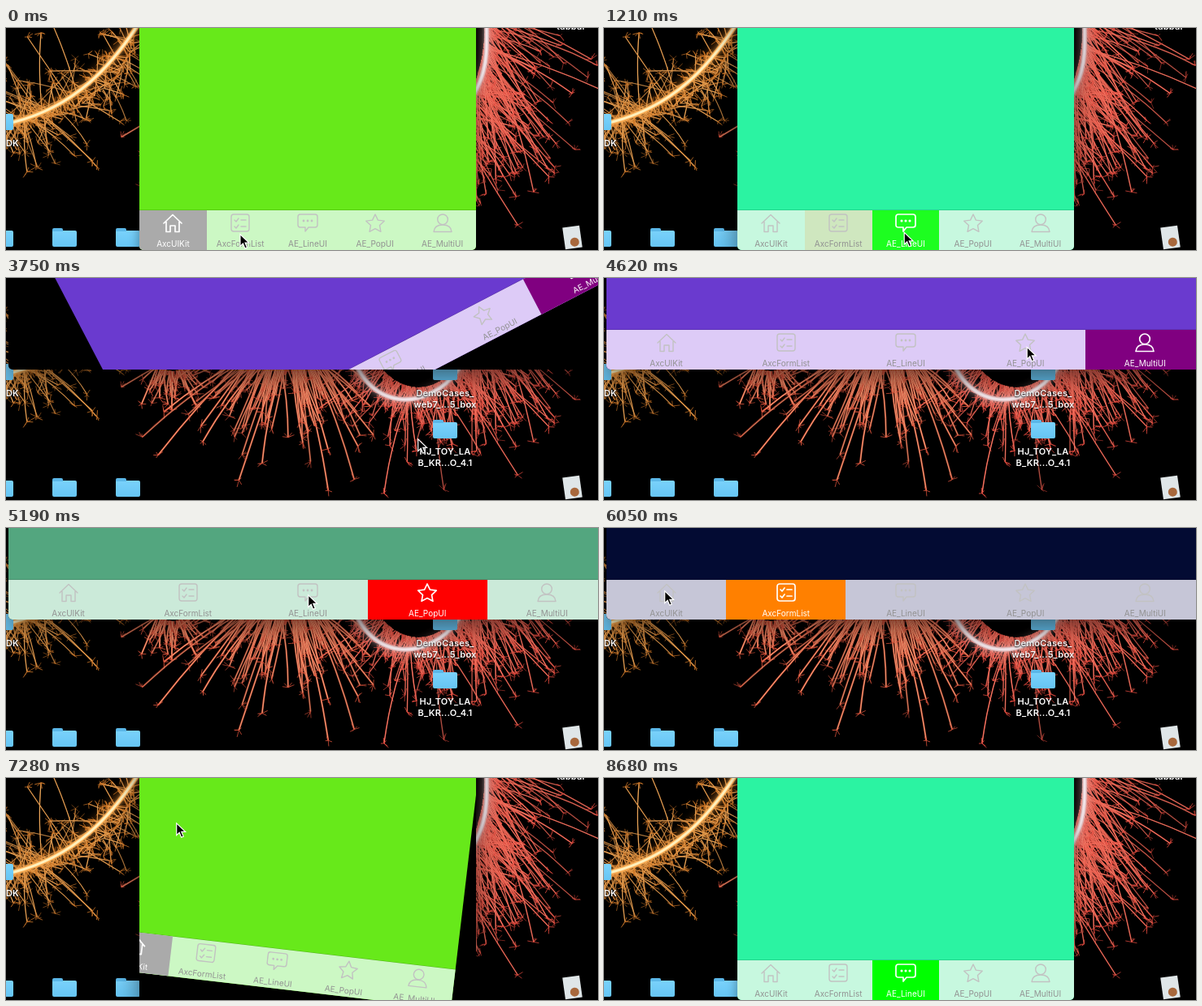
An HTML page with a canvas that plays this animation: 728 by 274 pixels, repeating every 8.78 s.

```html
<!DOCTYPE html>
<html lang="en">
<head>
<meta charset="utf-8">
<title>Tab bar demo</title>
<style>
  html, body { margin: 0; width: 100%; height: 100%; overflow: hidden; background: #000; }
  #stage { position: relative; width: 728px; height: 274px; overflow: hidden; background: #000; }
  #stage > * { position: absolute; }
  .folder { width: 30px; height: 20px; border-radius: 1px 2px 2px 2px;
    background: linear-gradient(#7ad2fb, #66c5f4); }
  .folder::before { content: ""; position: absolute; left: 0; top: -3px; width: 13px; height: 4px;
    border-radius: 2px 2px 0 0; background: #5bb7e8; }
  .label { width: 100px; text-align: center; color: #fff; font: 600 11px/14px Inter, "Open Sans", sans-serif;
    letter-spacing: .2px; text-shadow: 0 1px 2px #000; }
  .paper { left: 686px; top: 245px; width: 21px; height: 27px; background: #dfe6e8; transform: rotate(-8deg); }
  .paper::after { content: ""; position: absolute; left: 7px; top: 14px; width: 11px; height: 11px;
    border-radius: 50%; background: #a8683c; }
  #phone { overflow: hidden; background: #000; border-radius: 5px; }
  #view { position: absolute; left: 50%; top: 50%; }
  #bar { position: absolute; left: 0; right: 0; bottom: 0; height: 49px; display: flex;
    box-shadow: 0 -.5px rgba(0, 0, 0, .25); }
  .tab { position: relative; flex: 1; color: #929292; text-align: center;
    font: 10px/12px Inter, "Liberation Sans", sans-serif; }
  .tab i { position: absolute; inset: 0; }
  .tab svg { position: absolute; left: 50%; top: 3px; margin-left: -13px; width: 26px; height: 26px;
    fill: none; stroke: #c2c2c2; stroke-width: 1.4; stroke-linejoin: round; stroke-linecap: round; }
  .tab span { position: absolute; left: 0; width: var(--tab); top: 35px; white-space: nowrap; }
  .tab.on { color: #fff; }
  .tab.on svg { stroke: #fff; stroke-width: 1.7; }
  #cursor { left: 0; top: 0; width: 14px; height: 20px; overflow: visible; }
</style>
</head>
<body>
<div id="stage">
  <canvas id="sky" width="728" height="274"></canvas>
  <div class="folder" style="left:-21px;top:106px"></div>
  <div class="folder" style="left:-21px;top:250px"></div>
  <div class="folder" style="left:57px;top:250px"></div>
  <div class="folder" style="left:135px;top:250px"></div>
  <div class="folder" style="left:525px;top:106px"></div>
  <div class="folder" style="left:525px;top:178px"></div>
  <div class="label" style="left:-84px;top:135px;text-align:right">DK</div>
  <div class="label" style="left:645px;top:-9px">tabbar</div>
  <div class="label" style="left:490px;top:135px">DemoCases_<br>web7_...5_box</div>
  <div class="label" style="left:490px;top:207px">HJ_TOY_LA<br>B_KR...O_4.1</div>
  <div class="paper"></div>
  <div id="phone"><div id="view"><div id="bar"></div></div></div>
  <svg id="cursor" viewBox="0 0 14 20">
    <path d="M.7 .8V15.6L4.2 12.3 6.6 18.2 9.2 17.1 6.8 11.4H11.6Z" fill="#000" stroke="#fff" stroke-width="1.2"/>
  </svg>
</div>
<script>
const $ = id => document.getElementById(id);
const clamp = v => Math.min(1, Math.max(0, v));
const ease = v => v * v * (3 - 2 * v);
const mix = (a, b, p) => a + (b - a) * p;
const polar = (deg, rx, ry = rx) => [Math.cos(deg * Math.PI / 180) * rx, Math.sin(deg * Math.PI / 180) * ry];

// --- wallpaper: glowing rings that throw sparks outwards ---
const g = $('sky').getContext('2d');
let seed = 11;
const rnd = (a = 0, b = 1) => {
  seed = (seed * 16807) % 2147483647;
  return a + (b - a) * seed / 2147483647;
};

function streak(x, y, dx, dy, bend, color, width) {
  g.beginPath();
  g.moveTo(x, y);
  g.quadraticCurveTo(x + dx / 2 + bend, y + dy / 2 - Math.abs(bend), x + dx, y + dy);
  g.strokeStyle = color;
  g.lineWidth = width;
  g.stroke();
}

function spark(x, y, deg, len, { body, core, width }) {
  const [dx, dy] = polar(deg, len), bend = rnd(-.07, .07) * len;
  g.globalAlpha = rnd(.55, 1);
  streak(x, y, dx, dy, bend, body, width);
  if (len < 14) return;
  streak(x, y, dx, dy, bend, core, width * .45);
  for (let k = 0; k < 5; k++) streak(x + dx, y + dy, ...polar(rnd(0, 360), rnd(3, 9)), 0, body, .9);
}

// sparks leave the arc from..to of an ellipse; sag turns them off its radius
function burst(count, ellipse, from, to, sag, spread, maxLen, look) {
  const [cx, cy, rx, ry] = ellipse;
  for (let i = 0; i < count; i++) {
    const a = rnd(from, to), [x, y] = polar(a, rx, ry);
    spark(cx + x, cy + y, a + sag + rnd(-spread, spread), 6 + maxLen * rnd() ** 2, look);
  }
}

function glow(path, width, edge, middle) {
  const curve = new Path2D(path);
  g.globalAlpha = 1;
  [[edge, 1, 14], [middle, .5, 4]].forEach(([color, part, blur]) => {
    g.strokeStyle = g.shadowColor = color;
    g.shadowBlur = blur;
    g.lineWidth = width * part;
    g.stroke(curve);
  });
  g.shadowBlur = 0;
}

const gold = { body: '#c87428', core: '#ffd08a', width: 1.3 };
const red = { body: '#e04a3e', core: '#ff9a80', width: 1.5 };
const salmon = { body: '#d9533c', core: '#ffb587', width: 2.1 };
const left = [0, 0, 158, 116], pink = [507, -5, 82, 140], middle = [345, 60, 62, 50];

burst(170, left, 5, 95, 0, 180, 45, gold);
burst(70, left, 20, 100, 180, 60, 110, gold);
burst(55, left, 70, 100, 0, 45, 85, gold);
burst(60, [205, 70, 30, 45], 50, 130, 0, 30, 50, salmon);
burst(260, pink, 30, 165, 0, 45, 75, red);
burst(45, pink, 40, 140, 0, 22, 150, red);
burst(170, pink, -15, 45, 38, 32, 150, red);
burst(30, pink, -10, 25, 50, 18, 215, red);
burst(160, middle, 25, 165, 0, 25, 85, salmon);
burst(60, middle, 50, 145, 0, 12, 165, salmon);

glow('M166-10C130 48 84 97 10 116L-6 119', 6, '#f58a22', '#fff0bc');
glow('M422 80C440 168 520 166 557 112S591 40 591-6', 5.5, '#dba9a8', '#f3e6ea');

// --- tab bar ---
const starPoints = Array.from({ length: 10 }, (_, i) => {
  const [x, y] = polar(i * 36 - 90, i % 2 ? 5.8 : 11.8);
  return [13 + x, 13.8 + y];
}).join(' ');
const dots = [8, 13, 18].map(x => `<circle cx="${x}" cy="10" r=".7"/>`).join('');
const rows = [9, 17].map(y => `<path d="M6 ${y}l2 2 3-4m3 2h6"/>`).join('');

const TABS = [
  { name: 'AxcUIKit', color: '#aaaaaa', page: '#67e91a', bar: '#ccf8c4',
    icon: '<path d="M2 13 13 2.5 24 13M5 11V23.5H10V16H16V23.5H21V11"/>' },
  { name: 'AxcFormList', color: '#ff8000', page: '#030b33', bar: '#c6c6d7',
    icon: `<rect x="2" y="2" width="22" height="21" rx="3"/>${rows}` },
  { name: 'AE_LineUI', color: '#00ff00', page: '#2bf3a2', bar: '#c7f8df',
    icon: `<path d="M4 2H22q3 0 3 3V15q0 3-3 3H14l-4 5V18H4q-3 0-3-3V5q0-3 3-3Z"/>${dots}` },
  { name: 'AE_PopUI', color: '#ff0000', page: '#53a67f', bar: '#cbead9',
    icon: `<polygon points="${starPoints}"/>` },
  { name: 'AE_MultiUI', color: '#800080', page: '#6a3acf', bar: '#ddcbf7',
    icon: '<circle cx="13" cy="8.3" r="6.3"/><path d="M2 23.5C2.5 17.5 7 15 13 15s10.5 2.5 11 8.5Z"/>' }
];
$('bar').innerHTML = TABS.map(({ name, color, icon }) =>
  `<div class="tab"><i style="background:${color}"></i><svg viewBox="0 0 26 26">${icon}</svg><span>${name}</span></div>`
).join('');
const tabs = [...document.querySelectorAll('.tab')];

// --- timeline, in ms ---
const LOOP = 8780, FADE = 200, TURN = 365, TRAVEL = 150, LEAD = 230;
const FOCUS = 420, BLUR = 8680, WIDE = 3510, TALL = 7050;
const SHORT = 414, LONG = 736;
const isWide = t => t >= WIDE && t < TALL;

const TAPS = [[420, 1], [1040, 2], [1620, 3], [2500, 4], [4700, 3], [5240, 2], [5820, 1], [6280, 0], [8030, 2]]
  .map(([at, tab]) => ({ at, tab }));

// the hand drifts slightly from the first tab to the last
const aim = ({ at, tab }) => isWide(at)
  ? { x: mix(74, 668, tab / 4), y: mix(77, 87, tab / 4) }
  : { x: mix(206, 531, tab / 4), y: mix(256, 247, tab / 4) };

const STOPS = [
  ...TAPS.map(tap => ({ at: tap.at - LEAD, ...aim(tap) })),
  { at: 3030, x: 506, y: 198 },
  { at: 6580, x: 209, y: 55 }
].sort((a, b) => a.at - b.at);

function drawTabs(t) {
  const k = TAPS.findLastIndex(tap => tap.at <= t);
  const now = k < 0 ? 0 : TAPS[k].tab;
  const before = k < 1 ? 0 : TAPS[k - 1].tab;
  const p = k < 0 ? 1 : clamp((t - TAPS[k].at) / FADE);
  tabs.forEach((tab, i) => {
    tab.classList.toggle('on', i === now);
    tab.firstChild.style.opacity = i === now ? p : i === before ? 1 - p : 0;
  });
  $('view').style.background = TABS[now].page;
  $('bar').style.background = TABS[now].bar;
}

// places a box by its centre
function center(el, x, y, w, h) {
  Object.assign(el.style, { width: w + 'px', height: h + 'px', marginLeft: x - w / 2 + 'px', marginTop: y - h / 2 + 'px' });
}

function drawPhone(t) {
  const wide = isWide(t);
  const begin = wide ? WIDE + 10 : TALL - 73;
  const p = t < WIDE ? 1 : ease(clamp((t - begin) / TURN));
  const w = wide ? LONG : SHORT;
  const viewW = mix(SHORT + LONG - w, w, p);
  center($('phone'), 371, -94, w, SHORT + LONG - w);
  center($('view'), 0, 0, viewW, SHORT + LONG - viewW);
  $('view').style.transform = p < 1 ? `rotate(${(wide ? -90 : 90) * (1 - p)}deg)` : 'none';
  $('bar').style.setProperty('--tab', w / 5 + 'px');
  $('phone').style.boxShadow = t >= FOCUS && t < BLUR
    ? '0 10px 30px rgba(0,0,0,.55)' : '0 4px 14px rgba(0,0,0,.4)';
}

function drawCursor(t) {
  const next = STOPS.findIndex(stop => stop.at > t);
  const to = STOPS.at(next), from = STOPS[Math.max(0, (next < 0 ? STOPS.length : next) - 1)];
  const p = next < 0 ? 1 : ease(clamp(1 - (to.at - t) / TRAVEL));
  const away = (t > 2650 && t < 3030) || t > 8320;
  $('cursor').style.display = away ? 'none' : '';
  $('cursor').style.transform = `translate(${mix(from.x, to.x, p)}px, ${mix(from.y, to.y, p)}px)`;
}

const start = performance.now();
function tick() {
  const t = (performance.now() - start) % LOOP;
  drawTabs(t);
  drawPhone(t);
  drawCursor(t);
  requestAnimationFrame(tick);
}
tick();
</script>
</body>
</html>
```
